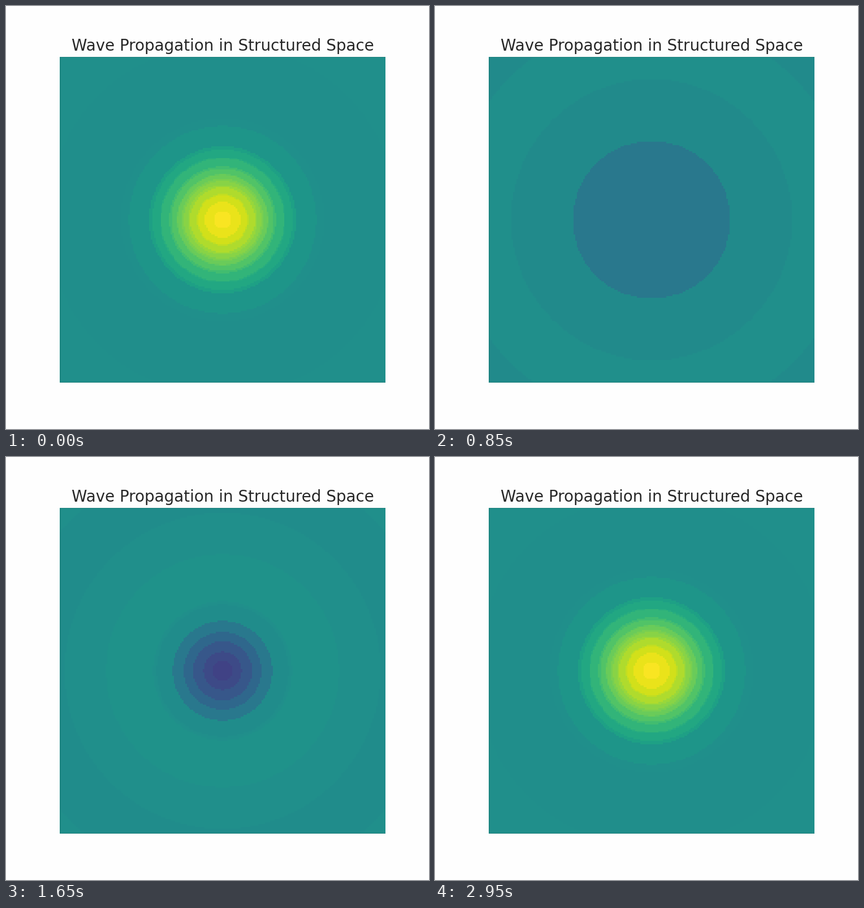
These frames come from a looping animation (748 px wide and 748 px high, 3 s). A matplotlib script:

```python
import matplotlib.pyplot as plt
import numpy as np
from matplotlib.animation import FuncAnimation
from matplotlib.colors import ListedColormap

FRAMES = 60
INTERVAL = 50
CYCLES = 6
GRID = 200

plt.rcParams["font.family"] = "DejaVu Sans"

axis = np.linspace(-2, 2, GRID)
x, y = np.meshgrid(axis, axis)
r2 = x**2 + y**2
envelope = np.exp(-2 * r2)

# Viridis entries grouped into coarse RGB cells (3, 4 and 3 bits per channel)
table = (plt.get_cmap("viridis")(np.arange(256))[:, :3] * 255).astype(int)
cells = (table[:, 0] >> 5) * 128 + (table[:, 1] >> 4) * 8 + (table[:, 2] >> 5)
_, group = np.unique(cells, return_inverse=True)
group = group.ravel()


def wave(i):
    phase = 2 * np.pi * CYCLES * i / (FRAMES - 1)
    return envelope * np.cos(r2 - phase)


def banded_cmap(z):
    """Viridis flattened to bands, each the mean colour of its pixels in z."""
    index = np.clip(((z + 1) * 128).astype(int), 0, 255)
    weight = np.bincount(index.ravel(), minlength=256) + 1e-6
    total = np.bincount(group, weights=weight)
    means = np.stack(
        [np.bincount(group, weights=weight * table[:, c]) / total for c in range(3)],
        axis=1,
    )
    return ListedColormap((np.floor(means + 1e-6)[group] + 0.5) / 256)


fig, ax = plt.subplots(figsize=(7.48, 7.48), dpi=100, facecolor="#fefefe")
ax.set_axis_off()
ax.set_title("Wave Propagation in Structured Space", fontsize=20,
             color="#272727", pad=7.4)
image = ax.imshow(wave(0), vmin=-1, vmax=1, cmap=banded_cmap(wave(0)),
                  interpolation="nearest")

# Thin darker rim, one pixel wide, just inside the field
px = 1 / 576
ax.add_patch(plt.Rectangle((px / 2, px / 2), 1 - px, 1 - px, fill=False,
                           transform=ax.transAxes, edgecolor="#1d7f7b",
                           linewidth=0.72))


def update(i):
    z = wave(i)
    image.set_data(z)
    image.set_cmap(banded_cmap(z))
    return (image,)


anim = FuncAnimation(fig, update, frames=FRAMES, interval=INTERVAL,
                     repeat=True, repeat_delay=0, blit=False)
plt.show()
```
